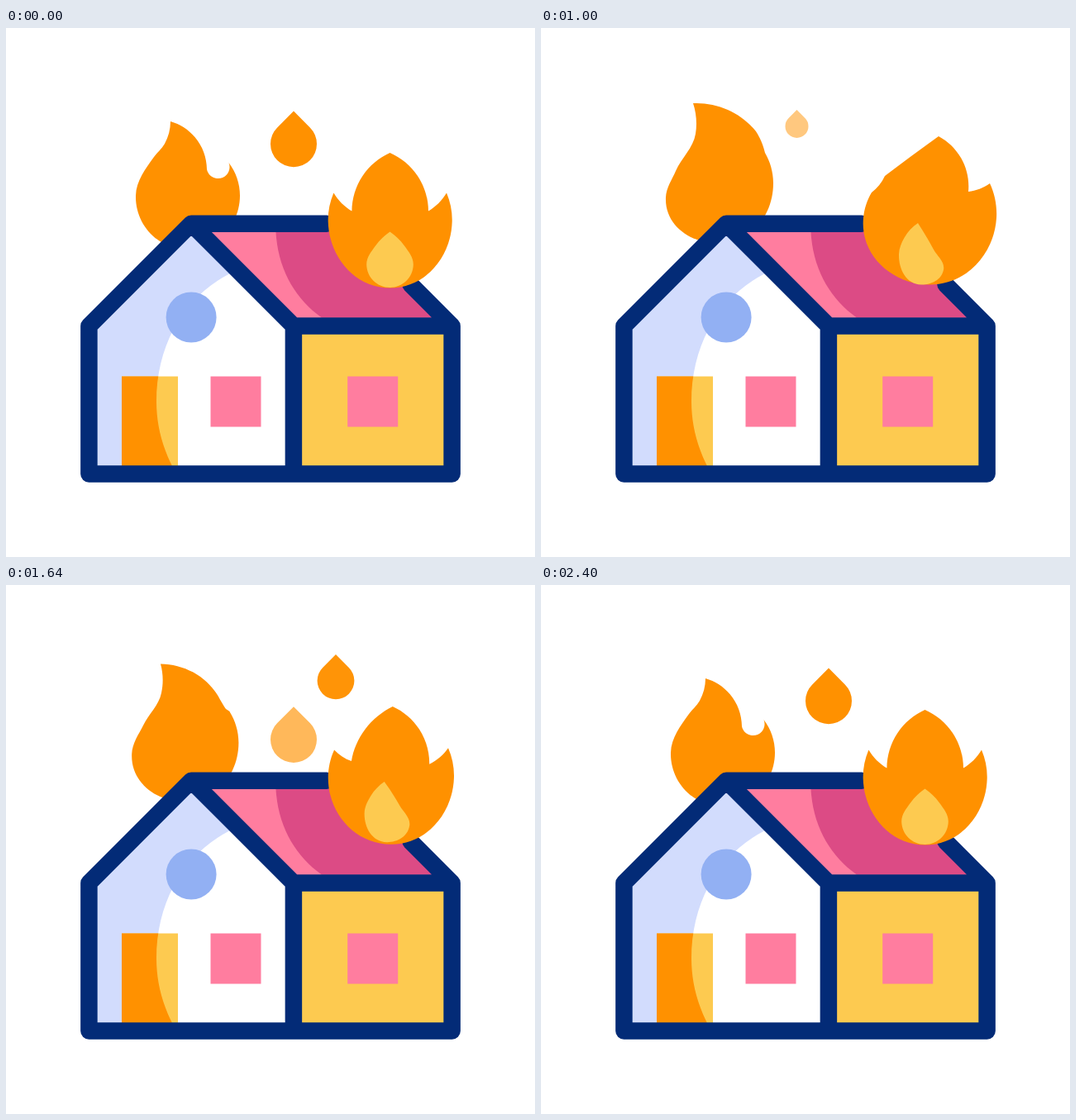
An HTML page for the animation above (2.42 s loop, 640 by 640 pixels).

```html
<!DOCTYPE html>
<html lang="en">
<head>
<meta charset="utf-8">
<title>House on fire</title>
<style>
  html, body { margin: 0; width: 100%; height: 100%; overflow: hidden; background: #fff; }
  svg { display: block; width: 100%; height: 100%; }
  .fire { fill: #ff9100; }
  .sun { fill: #fdca50; }
  .pink { fill: #ff7d9f; }
  .line { fill: none; stroke: #032b77; stroke-width: 20.5; stroke-linejoin: round; stroke-linecap: round; }
</style>
</head>
<body>
<svg viewBox="0 0 640 640">
  <defs>
    <clipPath id="shade">
      <path d="M271 297C218 324 182 380 182 452C182 480 189 506 201 530V540H100V240H271Z"/>
    </clipPath>
    <path id="front" d="M100.4 360.4L224.1 236.7L347.9 360.4V539.5H100.4Z"/>
  </defs>
  <path id="left" class="fire"/>

  <use href="#front" fill="#fff"/>
  <use href="#front" fill="#d2dcfd" clip-path="url(#shade)"/>
  <rect class="sun" x="140" y="421.5" width="68" height="112"/>
  <rect class="fire" x="140" y="421.5" width="68" height="112" clip-path="url(#shade)"/>
  <circle cx="224.1" cy="350" r="30.5" fill="#92b0f3"/>
  <rect class="pink" x="247.5" y="421.5" width="61" height="61"/>
  <rect class="sun" x="347.9" y="360.4" width="191.7" height="179"/>
  <rect class="pink" x="413.2" y="421.5" width="61" height="61"/>
  <path class="pink" d="M235 240H405L516 351L352 357Z"/>
  <path fill="#dc4b85" d="M326.5 240V247C329 292 350 328 382 350.5H524L413 240Z"/>
  <path class="line" d="M489.5 310.3L539.6 360.4V539.5H100.4V360.4L224.1 236.7L347.9 360.4V539.5M347.9 360.4H539.6M224.1 236.7H388"/>

  <path id="right" class="fire"/>
  <path id="core" class="sun"/>
  <g id="drops" class="fire"></g>
</svg>
<script>
const LOOP = 2420, CYCLE = 2400, STEP = 200, FRAME = 20, FADE = 400;
const SAG = 0.25; // how far an edge between two corners bends inwards, in radians

// Clockwise key points: tip and right side, a round body, then the left side.
// body: centre x, y, half width, tilt. Without a left side the right one is mirrored.
const flames = [
  { id: 'left', depth: 65, corners: [0, 2, 4], poses: [
    { body: [220, 203, 63, 0],
      right: [[199, 113], [228.5, 132], [243, 171], [255, 182], [269.5, 163]],
      left: [[179, 156], [192, 140]] },
    { body: [212, 194, 68, 20],
      right: [[218, 75.5], [216, 108], [223, 143], [240, 162], [262, 178]],
      left: [[153, 140], [183, 109]] },
    { body: [216, 196, 65, -9],
      right: [[184, 91], [226, 99], [260, 125], [268, 141], [271, 151]],
      left: [[163, 173], [187, 128]] }
  ] },
  { id: 'right', depth: 80.5, corners: [0, 2, 3, 7, 8], poses: [
    { body: [464.7, 234, 75, 0],
      right: [[464.5, 151], [498, 179], [511, 221.5], [533, 199.5]] },
    { body: [470.5, 230, 80.5, 0],
      right: [[481, 131], [508, 157], [517, 198], [543, 188]],
      left: [[400, 199], [416, 179], [448, 155]] },
    { body: [470.5, 240, 75, -4],
      right: [[481.7, 115.3], [513, 132.5], [527, 168], [540, 199]],
      left: [[410, 215], [439, 199], [467, 164]] },
    { body: [464.7, 234, 75, 0],
      right: [[448.4, 126.6], [478, 150], [510, 166], [538.5, 201]],
      left: [[396.5, 199.5], [427, 215.5], [430, 160]] }
  ] },
  { id: 'core', depth: 27.5, corners: [0], poses: [
    { body: [464.5, 286.5, 28.3, 0], right: [[464.5, 246.5], [482, 263.5]] },
    { body: [473, 286, 25.7, 2], right: [[466, 239], [491, 255]], left: [[457, 263]] },
    { body: [460, 283, 27, 9.5], right: [[456, 236], [475, 268]], left: [[440, 253]] }
  ] }
];

function outline({ body: [cx, cy, r, tilt], right, left }, depth) {
  left ??= right.slice(1).reverse().map(([x, y]) => [2 * cx - x, y]);
  return [...right, [cx + r, cy + tilt], [cx, cy + depth], [cx - r, cy - tilt], ...left];
}

// Joins the points with arc-like curves; corners take the mirrored end angle.
function curve(points, corners) {
  const n = points.length;
  const chords = points.map(([x, y], i) => {
    const [u, v] = points[(i + 1) % n];
    return { angle: Math.atan2(v - y, u - x), len: Math.hypot(u - x, v - y) };
  });
  const tangents = points.map((_, i) => {
    if (corners.includes(i)) return null;
    const a = chords[(i + n - 1) % n], b = chords[i];
    const mix = f => f(a.angle) * b.len + f(b.angle) * a.len;
    return Math.atan2(mix(Math.sin), mix(Math.cos));
  });
  const nums = [...points[0]];
  chords.forEach(({ angle, len }, i) => {
    const j = (i + 1) % n, [x, y] = points[i], [u, v] = points[j];
    const from = tangents[i] ?? (tangents[j] === null ? angle + SAG : 2 * angle - tangents[j]);
    const to = tangents[j] ?? 2 * angle - from;
    const reach = a => len / (3 * Math.cos((a - angle) / 2) ** 2);
    const p = reach(from), q = reach(to);
    nums.push(x + p * Math.cos(from), y + p * Math.sin(from),
              u - q * Math.cos(to), v - q * Math.sin(to), u, v);
  });
  return nums;
}

for (const f of flames) {
  f.el = document.getElementById(f.id);
  f.keys = f.poses.map(p => curve(outline(p, f.depth), f.corners));
}

function morph({ el, keys }, t) {
  const pos = t / STEP, i = Math.floor(pos), k = pos - i;
  const a = keys[i % keys.length], b = keys[(i + 1) % keys.length];
  const p = a.map((v, j) => (v + (b[j] - v) * k).toFixed(2));
  el.setAttribute('d', `M${p[0]} ${p[1]}C${p.slice(2).join(' ')}Z`);
}

// Each drop rises steadily, fades in up to its peak time and then out.
const drops = [
  { x: 348, y: 140.2, r: 28, speed: 0.32, peak: 0 },
  { x: 309.5, y: 160.5, r: 14, speed: 0.208, peak: 800 },
  { x: 399, y: 124.2, r: 22.4, speed: 0.21, peak: 1600 },
  { x: 348, y: 140.2, r: 28, speed: 0.292, peak: 1800 }
];

for (const d of drops) {
  const c = d.r * Math.SQRT1_2;
  d.el = document.createElementNS('http://www.w3.org/2000/svg', 'path');
  d.el.setAttribute('d', `M0 ${-2 * c}L${c} ${-c}A${d.r} ${d.r} 0 1 1 ${-c} ${-c}Z`);
  document.getElementById('drops').append(d.el);
}

function rise({ el, x, y, speed, peak }, t) {
  const dt = (t - peak + 1.5 * CYCLE) % CYCLE - CYCLE / 2;
  const k = Math.max(0, 1 - Math.abs(dt) / FADE);
  el.setAttribute('transform', `translate(${x} ${(y - dt * speed).toFixed(2)})`);
  el.setAttribute('opacity', k * k * (3 - 2 * k));
}

const start = performance.now();
function draw(now) {
  const ms = Math.max(0, now - start) % LOOP;
  const t = Math.floor(ms / FRAME) * FRAME;
  flames.forEach(f => morph(f, t));
  drops.forEach(d => rise(d, t));
  requestAnimationFrame(draw);
}
draw(start);
</script>
</body>
</html>
```
